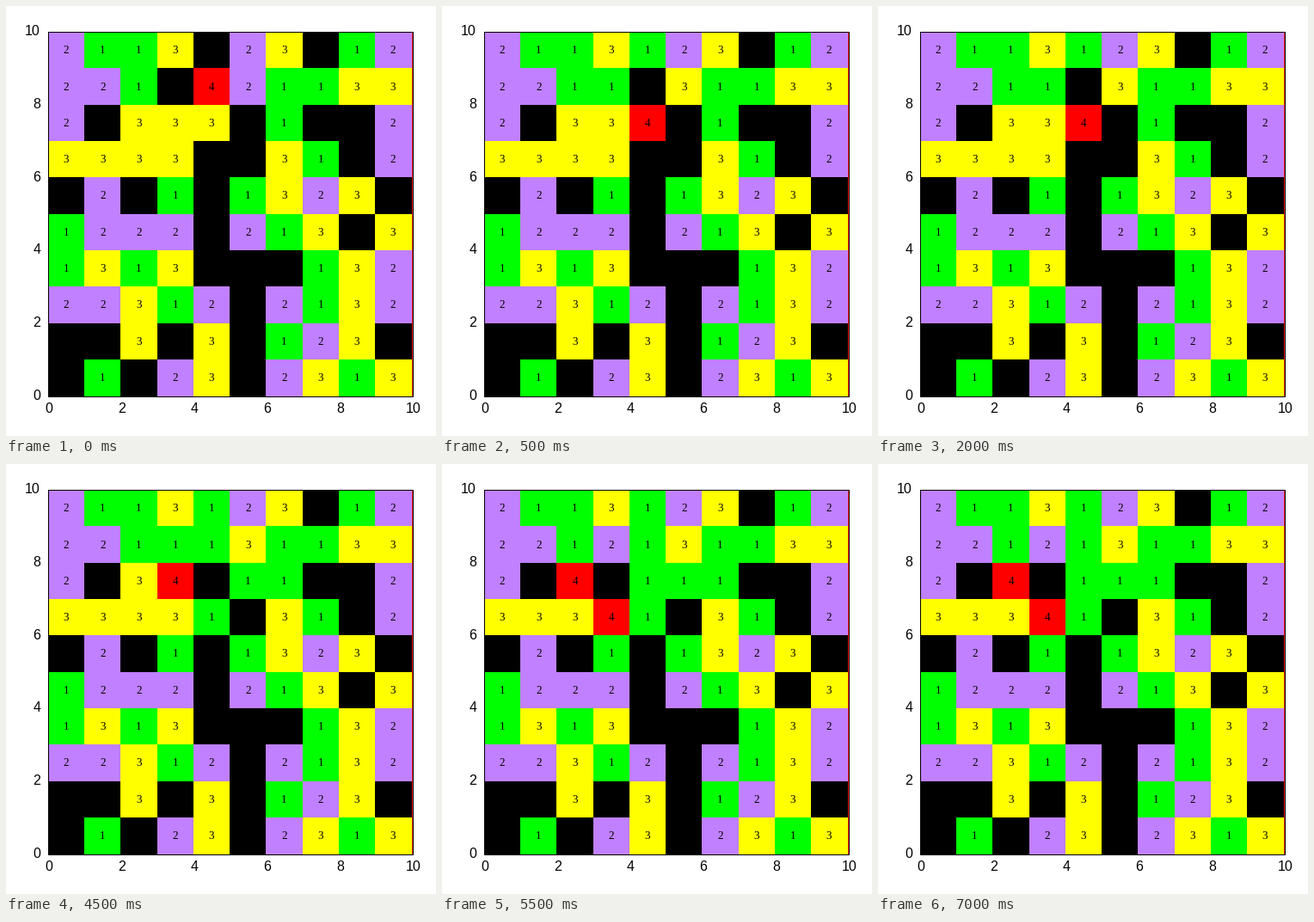
A matplotlib script that plays this animation: 500 px wide and 500 px high, repeating every 8000 ms.

```python
import numpy as np
import matplotlib.pyplot as plt
from matplotlib.animation import FuncAnimation
from matplotlib.colors import ListedColormap
from matplotlib.patches import Rectangle

plt.rcParams["text.hinting"] = "default"

SIZE, DPI = 500, 100
PT = 72 / DPI  # points per pixel
N = 10
LEFT, TOP, CELL_W, CELL_H = 49.5, 30.15, 42.22, 42.3
FRAME_X, FRAME_Y, FRAME_SIZE = 49, 30, 424
COLORS = ["#000000", "#00ff00", "#c080ff", "#ffff00", "#ff0000"]

START = np.array([[int(c) for c in row] for row in (
    "2113023012",
    "2210421133",
    "2033301002",
    "3333003102",
    "0201013230",
    "1222021303",
    "1313000132",
    "2231202132",
    "0030301230",
    "0102302313",
)])


def topple(grid):
    """Every cell holding four grains gives one to each neighbour."""
    full = np.pad((grid >= 4).astype(int), 1)
    gained = full[:-2, 1:-1] + full[2:, 1:-1] + full[1:-1, :-2] + full[1:-1, 2:]
    return grid - 4 * full[1:-1, 1:-1] + gained


states = [START]
for _ in range(3):
    states.append(topple(states[-1]))

fig = plt.figure(figsize=(SIZE / DPI, SIZE / DPI), dpi=DPI, facecolor="white")
ax = fig.add_axes([0, 0, 1, 1])
ax.set_xlim(0, SIZE)
ax.set_ylim(SIZE, 0)
ax.axis("off")

steps = np.arange(N + 1)
x_edges = np.floor(LEFT + CELL_W * steps)
y_edges = np.round(TOP + CELL_H * steps)
x_edges[-1] = FRAME_X + FRAME_SIZE - 1
y_edges[-1] = FRAME_Y + FRAME_SIZE

# The red backing shows as a thin strip beside the last column.
ax.add_patch(Rectangle((FRAME_X, FRAME_Y), FRAME_SIZE, FRAME_SIZE,
                       facecolor=COLORS[4], linewidth=0, zorder=0))
mesh = ax.pcolormesh(x_edges, y_edges, START, cmap=ListedColormap(COLORS),
                     vmin=-0.5, vmax=4.5, antialiased=False, linewidth=0,
                     zorder=1)
ax.add_patch(Rectangle((FRAME_X, FRAME_Y), FRAME_SIZE, FRAME_SIZE, fill=False,
                       edgecolor="black", linewidth=PT, zorder=2))

labels = [[ax.text(LEFT + CELL_W * (c + 0.5) - 0.5,
                   TOP + CELL_H * (r + 0.5) + 4, "",
                   family="Liberation Serif", fontsize=13 * PT,
                   ha="center", va="baseline")
           for c in range(N)] for r in range(N)]

tick_style = dict(family="Liberation Sans", fontsize=16 * PT, va="baseline")
for v in range(0, N + 1, 2):
    y = FRAME_Y + FRAME_SIZE * (1 - v / N)
    ax.text(40, y + 4, str(v), ha="right", **tick_style)
    ax.text(50.3 + 42.3 * v, 473, str(v), ha="center", **tick_style)


def draw(i):
    grid = states[(i + 4) // 5]
    mesh.set_array(grid)
    for row, values in zip(labels, grid):
        for label, value in zip(row, values):
            label.set_text(str(value) if value else "")
    return [mesh]


anim = FuncAnimation(fig, draw, frames=16, interval=500, repeat=True,
                     repeat_delay=0, blit=False)
plt.show()
```
